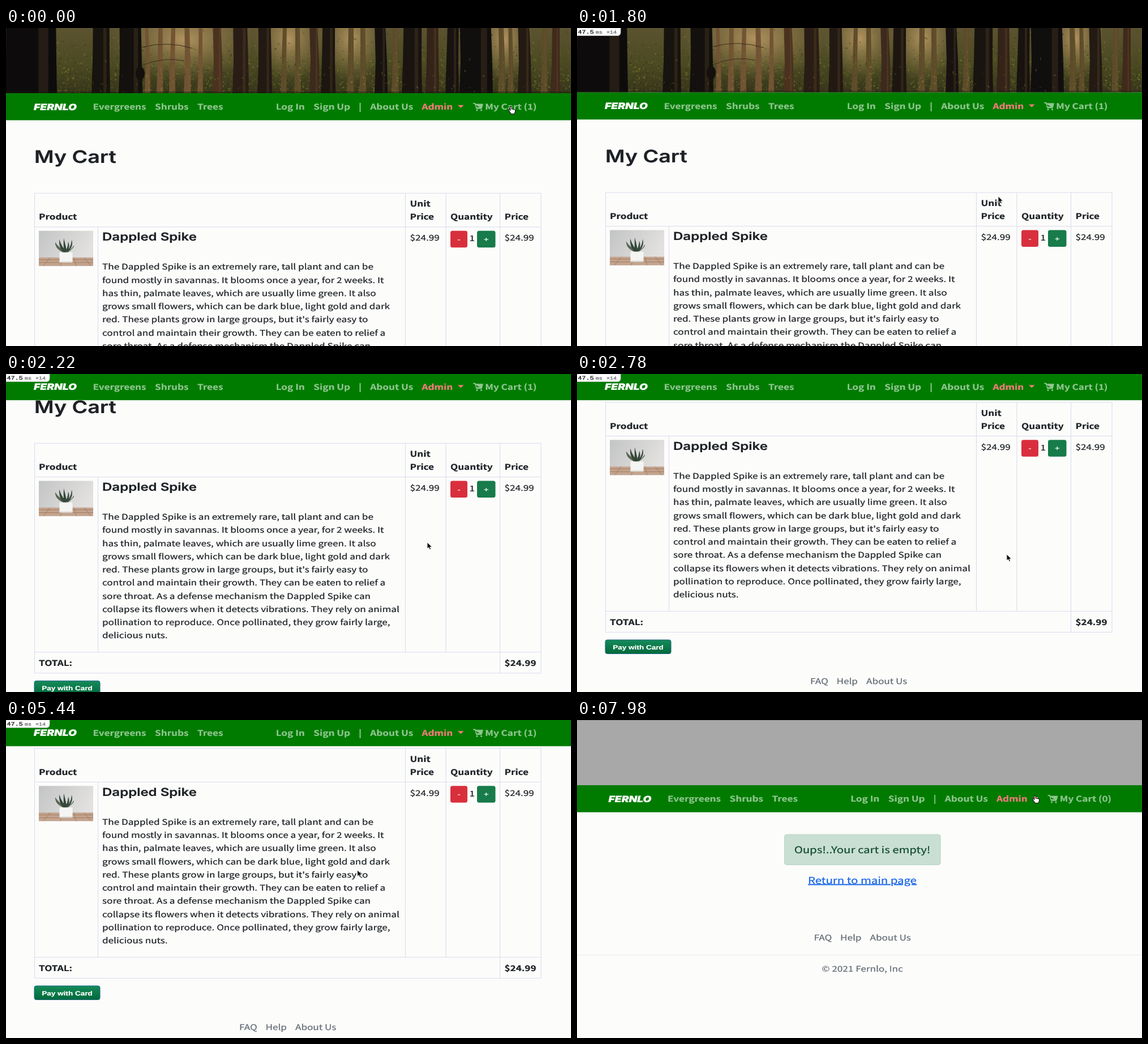
These frames come from a looping animation (998x561 px, 8 s). An HTML page:

```html
<!DOCTYPE html>
<html lang="en">
<head>
<meta charset="utf-8">
<title>My Cart</title>
<style>
  html, body { margin: 0; width: 100%; height: 100%; overflow: hidden; background: #fcfcfb; }
  svg { display: block; width: 100vw; height: 100vh; }
  text {
    font-family: "Noto Sans CJK JP", "Noto Sans CJK SC", "Noto Sans CJK KR", "Noto Sans CJK", "Noto Sans", sans-serif;
    text-rendering: geometricPrecision;
    white-space: pre;
  }
  .display { font-family: Inter, "Open Sans", sans-serif; }
  .button { font-family: "Liberation Sans", Arial, sans-serif; }
  .mono { font-family: "Liberation Mono", monospace; }
</style>
</head>
<body>
<svg id="stage" viewBox="0 0 998 561" preserveAspectRatio="none">
  <defs>
    <linearGradient id="woods" x2="0" y2="1">
      <stop offset="0" stop-color="#5c5330"/>
      <stop offset=".55" stop-color="#4b4a22"/>
      <stop offset="1" stop-color="#37351a"/>
    </linearGradient>
    <radialGradient id="glow">
      <stop offset="0" stop-color="#b1935f"/>
      <stop offset="1" stop-color="#8a7446" stop-opacity="0"/>
    </radialGradient>
    <filter id="soft" x="0" y="0" width="1" height="1"><feGaussianBlur stdDeviation=".7"/></filter>
    <linearGradient id="wall" x2="1" y2=".4">
      <stop offset="0" stop-color="#c3c4c5"/>
      <stop offset="1" stop-color="#e2e1df"/>
    </linearGradient>
    <linearGradient id="pay" x2="0" y2="1">
      <stop offset="0" stop-color="#168b5a"/>
      <stop offset="1" stop-color="#00693a"/>
    </linearGradient>
    <clipPath id="bannerClip"><rect width="998" height="115"/></clipPath>
  </defs>
  <g id="cart"></g>
  <g id="empty"></g>
  <g id="nav"></g>
  <g id="badge"></g>
  <path id="arrow" d="M0 0V11.2L2.7 8.9 4.5 12.8 6.6 11.9 4.9 8.2H8.6Z" fill="#0b0b0b" stroke="#fff" stroke-width=".9"/>
  <path id="hand" d="M-1.2 1Q0-.8 1.2 1V5L3.4 5.2 6.4 6Q8 6.5 7.6 9L6.2 13.5H.3L-3.7 8.2Q-4-.1-1.2 8Z" fill="#fff" stroke="#111" stroke-width="1.1"/>
</svg>
<script>
const LOOP = 8000, EMPTY_AT = 7900, BADGE_AT = 400;
const ASPECT = 1.232;
const INK = "#1d2125", MUTED = "#636c75", LINE = "#dadded", PALE = "#8fc68f";
const byId = id => document.getElementById(id);
const [cart, empty, nav, badge, arrow, hand] =
  ["cart", "empty", "nav", "badge", "arrow", "hand"].map(byId);

function add(parent, tag, attrs) {
  const el = document.createElementNS("http://www.w3.org/2000/svg", tag);
  for (const key in attrs) el.setAttribute(key, attrs[key]);
  return parent.appendChild(el);
}
function rect(parent, x, y, width, height, fill, more) {
  return add(parent, "rect", { x, y, width, height, fill, ...more });
}
function path(parent, d, fill, more) {
  return add(parent, "path", { d, fill, ...more });
}
// A hairline stroke matches the slightly heavy look of the recorded type.
function label(parent, x, y, str, { fill = INK, ...more } = {}) {
  const el = add(parent, "text", {
    transform: `translate(${x} ${y}) scale(${ASPECT} 1)`,
    "font-size": 13.9, fill, stroke: fill, "stroke-width": .22, ...more
  });
  el.textContent = str;
  return el;
}
function seeded(seed) {
  return () => (seed = (seed * 16807) % 2147483647) / 2147483647;
}

function drawForest(parent) {
  const g = add(parent, "g", { "clip-path": "url(#bannerClip)" });
  const scene = add(g, "g", { filter: "url(#soft)" });
  const rnd = seeded(77);
  rect(scene, 0, 0, 998, 115, "url(#woods)");
  for (const [cx, rx] of [[315, 130], [500, 65], [610, 60], [880, 50]])
    add(scene, "ellipse", { cx, cy: 20, rx, ry: 75, fill: "url(#glow)" });

  const leaves = (count, fill, opacity, top = 0) => {
    let d = "";
    const step = () => (rnd() * 5 - 2.5).toFixed(1);
    for (let i = 0; i < count; i++) {
      const x = 90 + rnd() * 908, y = top + (115 - top) * Math.sqrt(rnd());
      d += `M${x.toFixed(1)} ${y.toFixed(1)}l${step()} ${step()} ${step()} ${step()} ${step()} ${step()}z`;
    }
    path(scene, d, fill, { opacity });
  };
  const trunk = (x, w, fill) => {
    const lean = rnd() * 4 - 2;
    path(scene, `M${x + lean} 0h${w}L${x + w + 1} 60 ${x + w + 2} 115H${x - 2}L${x} 60Z`, fill);
    rect(scene, x + w * .65, 0, w * .2, 115, "#8a6a40", { opacity: .18 });
  };

  leaves(1000, "#7b8530", .7);
  leaves(1000, "#2b2e13", .6);
  for (const x of [247, 268, 290, 316, 340, 487, 511, 604, 626, 683, 871, 888, 946])
    trunk(x, 6 + rnd() * 4, x < 400 ? "#715333" : "#5d4b29");
  leaves(900, "#7d8a33", .6, 25);
  leaves(500, "#34391a", .6, 40);
  for (const [x, w, fill] of [
    [0, 88, "#0d0b0c"], [153, 29, "#17130e"], [201, 38, "#13100d"],
    [367, 14, "#4a321f"], [402, 25, "#2a1d15"], [446, 22, "#221913"],
    [538, 14, "#3d2a1c"], [558, 22, "#1d1610"], [653, 19, "#171210"],
    [701, 32, "#1a1410"], [743, 20, "#342318"], [778, 20, "#181310"],
    [803, 55, "#110e0e"], [906, 20, "#231a13"], [964, 13, "#402a1b"]
  ]) trunk(x, w, fill);
  add(scene, "ellipse", { cx: 237, cy: 80, rx: 8, ry: 12, fill: "#13100d" });
  path(scene, "M240 34Q285 22 330 36M240 66Q280 50 315 58", "none", { stroke: "#3a2d1b" });
  leaves(160, "#6b7a2b", .6, 45);
  rect(g, 0, 112, 998, 3, "#171b0a", { opacity: .4 });
}

function drawPlant(parent) {
  const g = add(parent, "g", { transform: "translate(58 357.8)" });
  rect(g, 0, 0, 96, 62, "url(#wall)");
  rect(g, 0, 47, 96, 15, "#c3a48e");
  path(g, "M0 51H96M0 56H96M20 47 8 62M42 47 38 62M62 47 66 62M80 47 92 62", "none",
    { stroke: "#9c735a", "stroke-width": .8 });
  for (const [x, y] of [[29, 20], [36, 15], [44, 13], [52, 19], [58, 16], [61, 26]])
    path(g, `M45 39Q${x - 1} 32 ${x} ${y}Q${x + 4} 28 50 39Z`, x % 2 ? "#56664f" : "#34473a");
  rect(g, 36.5, 38, 23, 18, "#f5f5f4", { rx: 1 });
  rect(g, 36.5, 54, 23, 2, "#dcd7d2");
}

function drawFooter(parent, dx, y) {
  label(parent, 412 + dx, y, "FAQ", { fill: MUTED });
  label(parent, 458.5 + dx, y, "Help", { fill: MUTED });
  label(parent, 511 + dx, y, "About Us", { fill: MUTED });
}

function drawCart() {
  const bold = { "font-weight": 700 };
  const white = { fill: "#fff", class: "button", "font-size": 12, "text-anchor": "middle" };
  rect(cart, 0, 0, 998, 803, "#fcfcfb");
  drawForest(cart);
  label(cart, 50, 238, "My Cart", { class: "display", "font-size": 30.5, "font-weight": 600 });

  path(cart, "M50 291.5H945.5M50 351H945.5M50 660H945.5M50 697H945.5" +
    "M50.5 291.5V697M162.5 351V660M705.5 291.5V660M777 291.5V660M872.5 291.5V697M945 291.5V697",
    "none", { stroke: LINE, "stroke-width": 1.1 });
  label(cart, 58, 338.3, "Product", bold);
  label(cart, 713.5, 315, "Unit", bold);
  label(cart, 713.5, 338.3, "Price", bold);
  label(cart, 785, 338.3, "Quantity", bold);
  label(cart, 880.5, 338.3, "Price", bold);

  drawPlant(cart);
  label(cart, 170, 375.3, "Dappled Spike", { class: "display", "font-size": 19.5, "font-weight": 600 });
  [
    "The Dappled Spike is an extremely rare, tall plant and can be",
    "found mostly in savannas. It blooms once a year, for 2 weeks. It",
    "has thin, palmate leaves, which are usually lime green. It also",
    "grows small flowers, which can be dark blue, light gold and dark",
    "red. These plants grow in large groups, but it's fairly easy to",
    "control and maintain their growth. They can be eaten to relief a",
    "sore throat. As a defense mechanism the Dappled Spike can",
    "collapse its flowers when it detects vibrations. They rely on animal",
    "pollination to reproduce. Once pollinated, they grow fairly large,",
    "delicious nuts."
  ].forEach((line, i) => label(cart, 170, 426.4 + i * 23.25, line));

  label(cart, 713.5, 375.3, "$24.99");
  label(cart, 880.5, 375.3, "$24.99");
  const minus = rect(cart, 785, 357.8, 30, 29.5, "#d92f3d", { rx: 3.5 });
  rect(cart, 832, 357.8, 32.5, 29.5, "#177b4a", { rx: 3.5 });
  label(cart, 800, 376.8, "-", white);
  label(cart, 848.2, 376.8, "+", white);
  label(cart, 818.5, 376.4, "1");

  label(cart, 58, 684, "TOTAL:", bold);
  label(cart, 880.5, 684, "$24.99", bold);
  rect(cart, 50, 710.5, 116, 24.5, "url(#pay)", { rx: 3.5, stroke: "#1a6584", "stroke-width": 1 });
  label(cart, 108, 727, "Pay with Card", { ...white, "font-size": 11, "font-weight": 700 });
  drawFooter(cart, 0, 788.5);
  return minus;
}

function drawEmpty() {
  const mid = { "text-anchor": "middle" };
  rect(empty, 0, 0, 998, 561, "#fcfcfb");
  rect(empty, 0, 0, 998, 115, "#a8a8a8");
  rect(empty, 0, 0, 998, 1, "#8b8b8b");
  rect(empty, 366.5, 202, 275.5, 53.5, "#c9dfd3", { rx: 4, stroke: "#b5d5c5" });
  label(empty, 504, 235, "Oups!..Your cart is empty!", { ...mid, "font-size": 16.5, fill: "#104a2e" });
  label(empty, 504, 288.5, "Return to main page",
    { ...mid, "font-size": 16.5, fill: "#1664e8", "text-decoration": "underline" });
  drawFooter(empty, 6.5, 389);
  rect(empty, 0, 414, 998, 1, "#e9eaef");
  label(empty, 504, 444, "© 2021 Fernlo, Inc", { ...mid, fill: MUTED });
}

function drawNav() {
  rect(nav, -10, 0, 1018, 47.7, "#007b00");
  label(nav, 49, 29.5, "FERNLO",
    { class: "display", fill: "#fff", "font-size": 15.6, "font-weight": 900, "font-style": "italic" });
  const link = (x, str, fill = PALE) => label(nav, x, 29.2, str, { fill, "font-weight": 700 });
  link(153.5, "Evergreens");
  link(263, "Shrubs");
  link(338, "Trees");
  link(476.7, "Log In");
  link(543.3, "Sign Up");
  link(623, "|");
  link(643.3, "About Us");
  link(734.6, "Admin", "#f57a7c");
  path(nav, "M798 21H808.5L803.2 26Z", "#f57a7c");
  path(nav, "M825 18H828.5L831 27H840.5M829 19.5H842L840.5 25.5H830.5Z", PALE,
    { stroke: PALE, "stroke-width": 1.4 });
  for (const cx of [832, 839.5]) add(nav, "circle", { cx, cy: 30, r: 1.6, fill: PALE });
  return link(846.3, "My Cart (1)");
}

function drawBadge() {
  const mono = { class: "mono", "font-size": 8.2, fill: "#666" };
  path(badge, "M0 0H77V8Q77 13.5 71 13.5H0Z", "#fff", { stroke: "#c9c9c9", "stroke-width": .8 });
  label(badge, 1.5, 10, "47.5", { ...mono, "font-size": 9.6, fill: "#111" });
  label(badge, 33, 10, "ms", mono);
  label(badge, 52, 10, "×14", mono);
}

const minus = drawCart();
drawEmpty();
const cartLink = drawNav();
drawBadge();

const scrollSteps = [
  [0, 0], [1760, 0], [1800, 1], [1860, 16], [1980, 71], [2100, 126],
  [2240, 176], [2400, 216], [2540, 235], [2700, 241.5], [LOOP, 241.5]
];
const pointerSteps = [
  [0, 892, 138], [250, 892, 139], [600, 860, 190], [1000, 770, 280], [1300, 744, 297],
  [2400, 744, 297], [2780, 759, 318], [3100, 740, 330], [3800, 420, 410], [4320, 295, 428],
  [4800, 300, 425], [5500, 650, 250], [6100, 800, 150], [6400, 809, 138],
  [7500, 809, 138], [7900, 809, 133], [LOOP, 809, 133]
];
function sample(steps, t) {
  const i = steps.findIndex(step => step[0] > t);
  const a = steps[i - 1], b = steps[i];
  const k = (t - a[0]) / (b[0] - a[0]);
  return a.slice(1).map((v, n) => v + (b[n + 1] - v) * k);
}
const show = (el, on) => el.setAttribute("visibility", on ? "visible" : "hidden");
const move = (el, x, y) => el.setAttribute("transform", `translate(${x} ${y})`);

function render(t) {
  const isEmpty = t >= EMPTY_AT;
  const [scroll] = sample(scrollSteps, t);
  const [x, y] = sample(pointerSteps, t);
  const overLink = x > 785 && y < 152;

  show(cart, !isEmpty);
  show(empty, isEmpty);
  show(badge, t >= BADGE_AT && !isEmpty);
  move(cart, 0, -scroll);
  move(nav, isEmpty ? 6.5 : 0, isEmpty ? 115 : Math.max(115 - scroll, -1.5));
  cartLink.textContent = `My Cart (${isEmpty ? 0 : 1})`;
  minus.setAttribute("fill", overLink && scroll > 200 ? "#c72b39" : "#d92f3d");
  show(arrow, !overLink);
  show(hand, overLink);
  move(arrow, x, y);
  move(hand, x, y);
}

const start = performance.now();
function tick() {
  render((performance.now() - start) % LOOP);
  requestAnimationFrame(tick);
}
tick();
</script>
</body>
</html>
```
